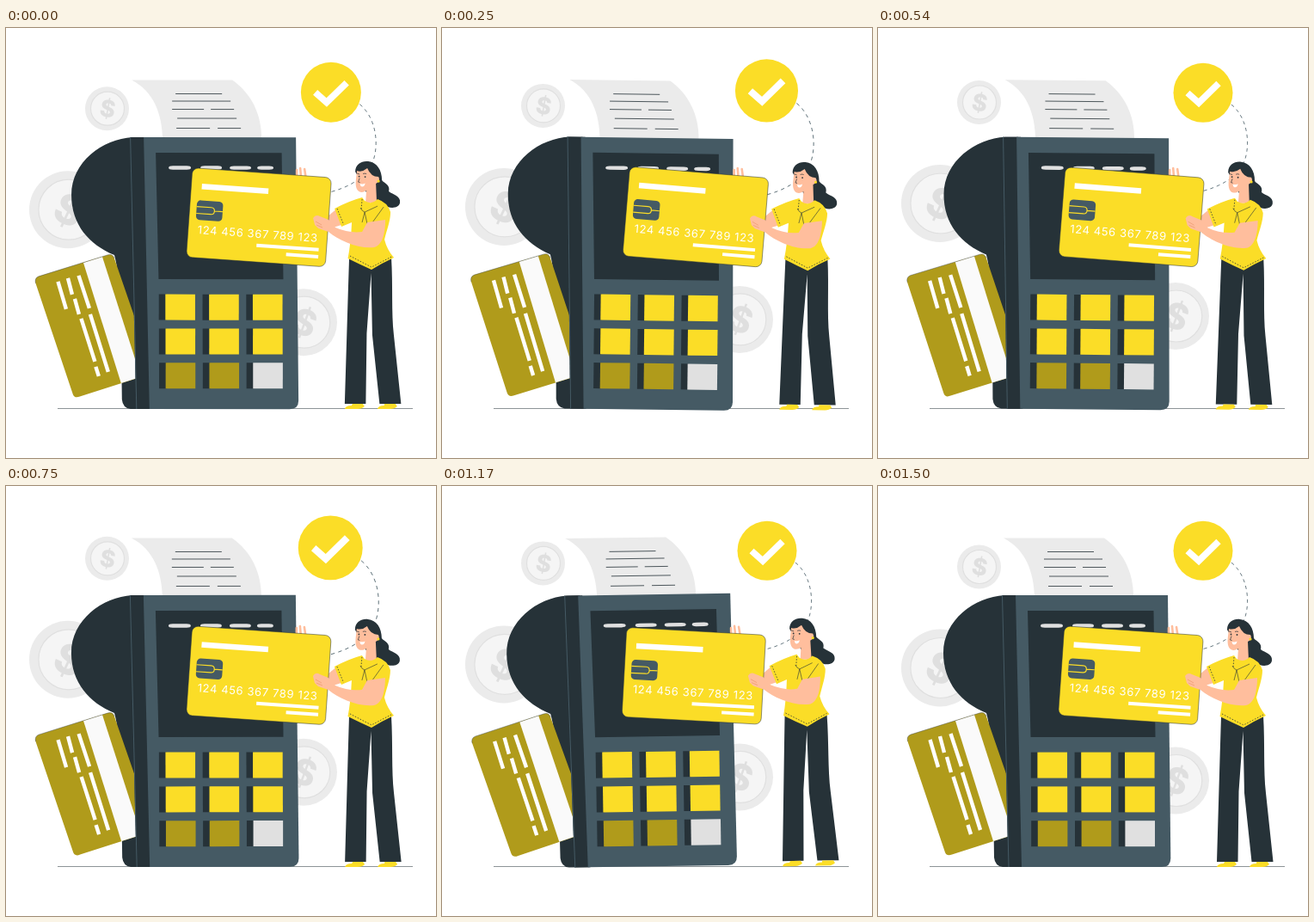
Write an HTML page that moves like this. It is 500 by 500 pixels and loops after 1.54 s.

```html
<!DOCTYPE html>
<html lang="en">
<head>
<meta charset="utf-8">
<title>Card payment</title>
<style>
html, body { margin: 0; width: 100%; height: 100%; overflow: hidden; background: #fff; }
svg { display: block; width: 100vw; height: 100vh; }
.dark { fill: #263238; }
.mid { fill: #455a64; }
.sun { fill: #fbdd27; }
.olive { fill: #b09b1b; }
.white { fill: #fff; }
.pale { fill: #ebebeb; }
.skin { fill: #ffbe9d; }
.line { fill: none; stroke: #263238; }
.coin text { font: 800 1px Inter, Arial, sans-serif; fill: #dfdfdf; text-anchor: middle; }
.number { font: 400 13px Inter, Arial, sans-serif; fill: #fff; letter-spacing: .63px; }
</style>
</head>
<body>
<svg viewBox="0 0 500 500">
  <g id="coins"></g>

  <g id="badge">
    <path d="M411 89C429 104 433 132 427 152C420 172 400 184 376 190" fill="none" stroke="#455a64" stroke-width=".8" stroke-dasharray="4 4"/>
    <circle cx="378" cy="75.3" r="34.5" class="sun"/>
    <path d="M360 75.5L373 87L396 64.5" fill="none" stroke="#fff" stroke-width="7.6"/>
  </g>

  <path d="M60 442.5H473" class="line" stroke-width=".7" opacity=".75"/>

  <g id="device">
    <path class="pale" d="M146 60.5H263C285 76 297 100 297 128H182C181 100 172 74 146 60.5Z"/>
    <path class="line" stroke-width=".8" d="M197 76.5H251M193 85H261M193 94.5H230M238 94.5H265M199 105H268M198 116.5H237M246 116.5H273"/>

    <path class="dark" d="M165 127H147C112 129 76 156 76 194C76 229 97 252 126 264C133 290 133 330 134 360L135 432Q136 442 145 443H170Z"/>

    <path class="olive" d="M38 289L118 264Q124 262 126 268L172 401L86 428.5Q80 431 78 426L34.5 297Q33 291 38 289Z"/>
    <path fill="#fafafa" d="M90 273L112 266L157 405.7L134 413Z"/>
    <path class="line" stroke-width=".4" d="M34.5 297Q33 291 38 289L118 264Q124 262 126 268"/>
    <path fill="none" stroke="#fff" stroke-width="4.4" d="M60.5 295L70 327M72 291L77 310M80 315L85 333M84.5 288L97 326M87.5 338L103.5 388M98 333L119 400M104.5 394L108 405"/>

    <path class="dark" d="M144 127H162L169 443H151.5Z"/>
    <path d="M144.5 127L152 443" fill="none" stroke="#455a64"/>
    <path class="mid" d="M160 127H337L340.3 433Q340.3 443 330 443H167Z"/>
    <path class="dark" d="M174 145H320.5L322.5 292H177.5Z"/>
    <g id="slots" fill="#e0e0e0"></g>
    <g id="keys"></g>
  </g>

  <g id="payer">
    <path d="M338 174V165M343 174L342 163M348.5 174L347 164" fill="none" stroke="#ffbe9d" stroke-width="2.6" stroke-linecap="round"/>
    <path class="skin" d="M368 224L386 209L393 228L374 234Z"/>

    <g transform="translate(216.8 162.7) rotate(4)">
      <rect class="sun" width="162" height="104" rx="7" stroke="#263238" stroke-width=".5"/>
      <g class="white">
        <rect x="12.3" y="17.7" width="77.6" height="6.5"/>
        <rect x="80.5" y="82.6" width="72.5" height="4"/>
        <rect x="115.6" y="90.7" width="37.5" height="4"/>
      </g>
      <g transform="translate(8 37)">
        <rect class="mid" width="30.5" height="23" rx="4.5"/>
        <path d="M0 7.5H17q4 0 4 4t-4 4H0M21 11.5H30.5" fill="none" stroke="#fbdd27" stroke-width="1.2"/>
      </g>
      <text class="number" x="11" y="75.8">124 456 367 789 123</text>
    </g>

    <path class="dark" d="M406 167C406 158 414 154 421 155C431 156 437 165 437 177C440 181 447 182 445 190C450 194 459 195 458 203C457 209 449 210 444 208C434 207 424 205 421 195Z"/>
    <path class="skin" d="M408 166C407 176 405 184 409 189C412 192 416 191 419 189L418 203L431 203L430 181Q436 178 433 173Q424 173 420 163Q414 168 408 166Z"/>
    <path class="line" stroke-width=".7" d="M408 169l3 1M415 169.500q2-1 4 0M411 174.500l-1.500 4.500 2 .5"/>
    <circle class="dark" cx="410.5" cy="172.5" r=".9"/>
    <circle class="dark" cx="417.5" cy="173" r=".9"/>
    <path class="white" d="M411.5 181q3 1 6-.5q-.5 4-3.5 4q-2 0-2.500-3.500Z"/>
    <circle class="sun" cx="433" cy="178" r="1.6"/>

    <path class="dark" d="M399 268L425 276L448 267C450 300 448 330 451 357L459.5 437H434.5L426 357L424.5 285L419.5 355L418.5 437H394L398 300Z"/>
    <path class="sun" d="M394 443q1-4 8-4l1-2h12l2 3q-3 3-8 3ZM432 443q1-4 8-4l0-2h13l2 3q-3 3-8 3Z"/>

    <path class="sun" d="M382 210Q399 201 414 197L417 201Q425 206 432 199Q444 203 447 214C447 224 443 234 440 246Q443 258 451 267L437 274L425 281L412 275L397.5 268Q401 250 402 226L390 231Z"/>
    <path class="line" stroke-width=".8" stroke-dasharray="1.500 1.800" d="M385 210L392.500 228.500M400 265L425 278L448 266M414 199L413 211"/>
    <path class="line" stroke-width=".6" d="M412 209Q414 213 417 214L432 207M417 214L414 226M417 214L420 228M439 208L426 226"/>
    <path class="skin" d="M357 221Q360 216 365 219L375 223L383 232Q399 239 414 237L420 226L441 223C441 240 437 253 428 255C409 257 387 247 375 237L363 233L359 229Z"/>
    <path d="M360 225L367 229M361 229L368 232" fill="none" stroke="#eb996e" stroke-width=".7"/>
  </g>
</svg>
<script>
const $ = id => document.getElementById(id);
const LOOP = 1540, BEAT = 1500, LEAD = 20;

// x, y, outer radius, inner radius, tilt
const coins = [[72, 211.5, 45, 35, 25], [117.5, 94, 25.5, 19.5, 10], [346, 342.5, 39, 30, 20]];
$('coins').innerHTML = coins.map(([x, y, r, inner, tilt]) => `
  <g class="coin" transform="translate(${x} ${y})">
    <circle r="${r}" class="pale"/>
    <circle cx="${r * .02}" r="${inner}" fill="#f5f5f5" stroke="#e0e0e0" stroke-width="1.2"/>
    <g transform="translate(${r * .03} 0) rotate(${tilt}) scale(${r * 1.07})"><text y=".36">$</text></g>
  </g>`).join('');

$('slots').innerHTML = [[189, 26], [226, 25], [260, 25], [292, 19]].map(([x, w]) =>
  `<rect x="${x}" y="160.3" width="${w}" height="4.4" rx="5" ry="2.2"/>`).join('');

let keys = '';
for (let row = 0; row < 3; row++) {
  for (let col = 0; col < 3; col++) {
    const x = 177.8 + col * 50.8 + row * .2, y = 309.6 + row * 39.8;
    const tone = row < 2 ? '#fbdd27' : col < 2 ? '#b09b1b' : '#e0e0e0';
    keys += `<rect class="dark" x="${x}" y="${y}" width="9" height="30"/>
      <rect x="${x + 7.6}" y="${y}" width="34.6" height="30" fill="${tone}"/>`;
  }
}
$('keys').innerHTML = keys;

// Linear interpolation through [phase, value] stops
function track(stops, p) {
  const i = Math.max(1, stops.findIndex(s => s[0] >= p));
  const [p0, a] = stops[i - 1], [p1, b] = stops[i];
  return a + (b - a) * (p - p0) / (p1 - p0);
}
const sway = [[0, 0], [.25, 1], [.75, -1], [1, 0]];
const lift = [[0, 0], [.5, -10], [1, 0]];
const pulse = [[0, 1], [.1, 1.1], [.3, 1], [.4, 1], [.5, 1.1], [.6, 1], [1, 1]];

const move = (id, transform) => $(id).setAttribute('transform', transform);

function draw() {
  const p = Math.min(performance.now() % LOOP + LEAD, BEAT) / BEAT;
  const angle = track(sway, p);
  // Each group sways about the middle of its own box
  move('device', `rotate(${angle} 187 252)`);
  move('payer', `rotate(${angle} 335 299)`);
  move('coins', `translate(0 ${track(lift, p)})`);
  move('badge', `translate(387 115) scale(${track(pulse, p)}) translate(-387 -115)`);
  requestAnimationFrame(draw);
}
draw();
</script>
</body>
</html>
```
